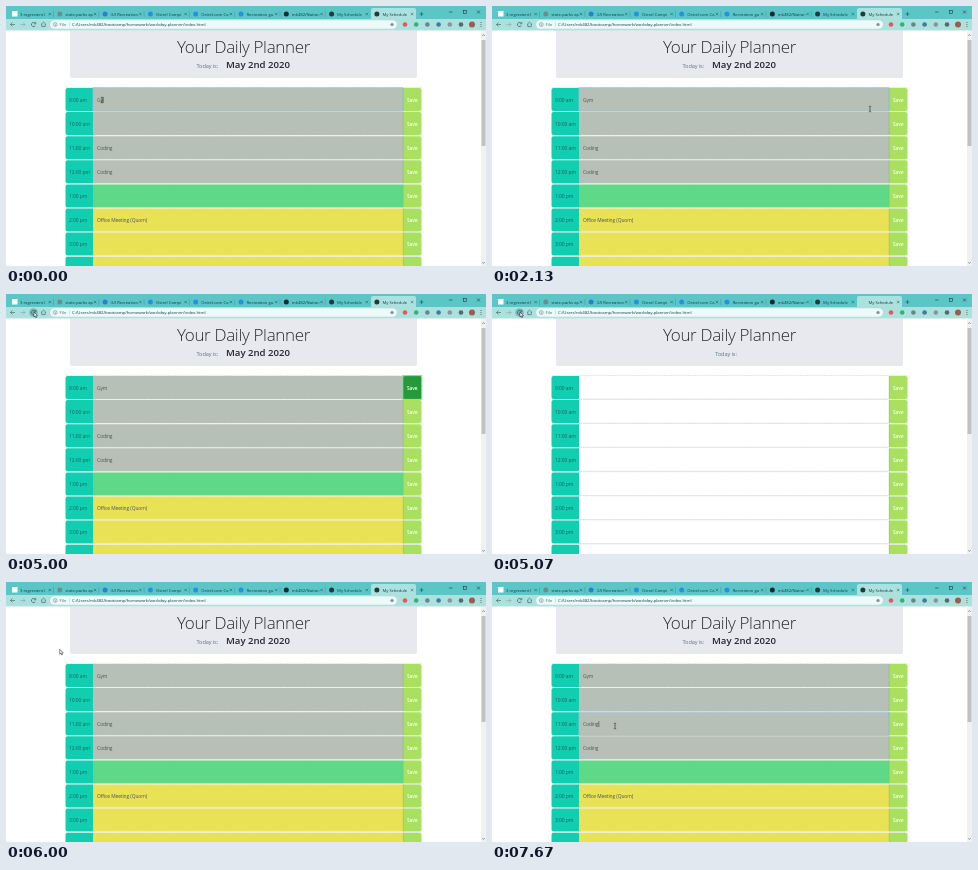
Animation, 480 px wide and 260 px high, one loop 8000 ms. Source, as an HTML page with a canvas:

```html
<!DOCTYPE html>
<html lang="en">
<head>
<meta charset="utf-8">
<title>Your Daily Planner</title>
<style>
html, body { margin: 0; width: 480px; height: 260px; overflow: hidden; background: #fff; }
canvas { display: block; width: 480px; height: 260px; }
</style>
</head>
<body>
<canvas id="stage"></canvas>
<script>
const LOOP = 8000, BLINK = 530;
const FONT = '"Open Sans", "Noto Sans", sans-serif';
const canvas = document.getElementById('stage');
const ctx = canvas.getContext('2d');
const scale = window.devicePixelRatio || 1;
canvas.width = 480 * scale;
canvas.height = 260 * scale;

const COLORS = { past: '#b7c0b6', now: '#5fd987', next: '#eae256', hour: '#12ceb0', save: '#a9e05f', focus: '#259a3b' };
const ROWS = [
  ['9:00 am', 'past', ''], ['10:00 am', 'past', ''], ['11:00 am', 'past', 'Coding'],
  ['12:00 pm', 'past', 'Coding'], ['1:00 pm', 'now', ''],
  ['2:00 pm', 'next', 'Office Meeting (Quom)'], ['3:00 pm', 'next', ''], ['4:00 pm', 'next', '']
];
const TABS = [
  ['3 regrevient l', '#ffffff', 'square'], ['state-parks api', '#6d8c92'], ['(U) Recreation', '#2a7fd0'],
  ['Ostrel Campi', '#2a8fe0'], ['Ostrel.com Ca', '#2a8fe0'], ['Recreation gu', '#2a8fe0'],
  ['mk482/Nation', '#1c2a2e'], ['My Schedule', '#24393d'], ['My Schedule', '#24393d']
];
const URL_TEXT = 'C:/Users/mk482/bootcamp/homework/workday-planner/index.html';

// Pointer path: time, x, y, easing into this point
const PATH = [
  [0, 96, 94], [800, 96, 94], [1330, 103, 97], [1540, 103, 97],
  [2130, 378, 103], [2470, 407, 97], [3540, 407, 97],
  [4400, 30, 21], [4470, 30, 21], [4670, 28, 18], [5340, 28, 18],
  [6000, 53.5, 67, 'in'], [6200, 75, 89, 'out'], [6330, 78, 90],
  [6470, 78, 90], [6670, 71, 100], [6800, 71, 100], [7330, 123, 144], [LOOP, 123, 144]
];
const EASE = {
  in: p => Math.pow(p, 1.5),
  out: p => 1 - (1 - p) * (1 - p),
  both: p => p * p * (3 - 2 * p)
};

const clamp = v => Math.max(0, Math.min(1, v));
const rowTop = i => 82 + 24.1 * i;

function pointerAt(t) {
  const i = PATH.findIndex(k => k[0] > t);
  const a = PATH[i - 1], b = PATH[i];
  const p = EASE[b[3] || 'both']((t - a[0]) / (b[0] - a[0]));
  return { x: a[1] + (b[1] - a[1]) * p, y: a[2] + (b[2] - a[2]) * p };
}

function rect(x, y, w, h, color, radius = 0) {
  ctx.fillStyle = color;
  ctx.beginPath();
  ctx.roundRect(x, y, w, h, radius);
  ctx.fill();
}

function dot(x, y, r, color) {
  ctx.fillStyle = color;
  ctx.beginPath();
  ctx.arc(x, y, r, 0, 7);
  ctx.fill();
}

function line(points, color, width = 0.6) {
  ctx.strokeStyle = color;
  ctx.lineWidth = width;
  ctx.beginPath();
  points.forEach(([x, y], i) => i ? ctx.lineTo(x, y) : ctx.moveTo(x, y));
  ctx.stroke();
}

function text(str, x, y, size, color, weight = 400, align = 'left', spacing = 0) {
  ctx.font = `${weight} ${size}px ${FONT}`;
  ctx.letterSpacing = spacing + 'px';
  ctx.textAlign = align;
  ctx.fillStyle = color;
  ctx.fillText(str, x, y);
  return ctx.measureText(str).width;
}

function drawTabs(loading) {
  rect(0, 0, 480, 13, '#5cc6c7');
  rect(365, 2, 45, 12, '#ace1dd', [2, 2, 0, 0]);
  TABS.forEach(([name, color, shape], i) => {
    const x = 3 + i * 45.3, last = i === TABS.length - 1;
    if (!(last && loading)) {
      if (shape) rect(x + 3, 5, 5.5, 5.5, color);
      else dot(x + 5.5, 8, 2.5, color);
    }
    ctx.save();
    ctx.beginPath();
    ctx.rect(x + 11, 2, 27.5, 11);
    ctx.clip();
    text(name, x + 11, 9.7, 4.2, '#173c40');
    ctx.restore();
    line([[x + 39.5, 6.8], [x + 42, 9.3]], '#244b4f', 0.5);
    line([[x + 42, 6.8], [x + 39.5, 9.3]], '#244b4f', 0.5);
    if (i < 7) line([[x + 44.5, 5], [x + 44.5, 11]], '#348f93', 0.4);
  });
  line([[413.5, 8], [417.5, 8]], '#1d4a4e');
  line([[415.5, 6], [415.5, 10]], '#1d4a4e');
  line([[443, 6], [446.5, 6]], '#173c40');
  ctx.strokeRect(457.5, 4.5, 3, 3);
  line([[471, 4.5], [474, 7.5]], '#173c40');
  line([[474, 4.5], [471, 7.5]], '#173c40');
}

function drawToolbar(hover, pressed) {
  const ink = '#34595c';
  rect(0, 13, 480, 11.5, '#ace1dd');
  line([[9, 18.5], [4.5, 18.5], [6.5, 16.5]], ink);
  line([[4.5, 18.5], [6.5, 20.5]], ink);
  line([[14.5, 18.5], [19, 18.5], [17, 16.5]], '#78a8a8');
  line([[19, 18.5], [17, 20.5]], '#78a8a8');
  if (hover) dot(27.5, 18.5, 4.3, pressed ? '#79b9b8' : '#91cbc8');
  ctx.strokeStyle = ink;
  ctx.lineWidth = 0.7;
  ctx.beginPath();
  ctx.arc(27.5, 18.5, 2.1, 0.5, 5.7);
  ctx.stroke();
  line([[29.8, 15.9], [29.8, 17.8], [27.9, 17.8]], ink);
  line([[35, 18.5], [37.5, 16.2], [40, 18.5]], ink);
  line([[35.8, 18], [35.8, 20.6], [39.2, 20.6], [39.2, 18]], ink);

  rect(44, 14.3, 347, 8.4, '#eefaf9', 4.2);
  ctx.strokeStyle = '#566b6d';
  ctx.lineWidth = 0.5;
  ctx.beginPath();
  ctx.arc(49.3, 18.5, 1.9, 0, 7);
  ctx.stroke();
  line([[49.3, 17.8], [49.3, 19.6]], '#566b6d', 0.5);
  text('File', 53.5, 20, 4.3, '#566b6d');
  line([[63.5, 16.3], [63.5, 20.7]], '#a9bdbd', 0.4);
  text(URL_TEXT, 66, 20, 4.35, '#26383b', 400, 'left', -0.06);
  dot(386, 18.5, 1.6, '#789395');
  ['#e05b55', '#2fb477', '#6c8588', '#3e7d9c', '#8a9698', '#526b70'].forEach((c, i) => dot(399 + i * 11.2, 18.5, 2.3, c));
  dot(466, 18.5, 3, '#9c5b50');
  [-2, 0, 2].forEach(d => dot(475, 18.5 + d, 0.5, ink));
}

function drawScrollbar() {
  rect(475, 24.5, 5, 235.5, '#f1f1f1');
  rect(475.5, 34, 4, 106, '#c1c1c1');
  line([[476.2, 30], [477.5, 28.5], [478.8, 30]], '#666');
  line([[476.2, 256], [477.5, 257.5], [478.8, 256]], '#666');
}

function drawHeader(loading) {
  rect(64, 24.5, 347, 47.5, '#e8e9ee', [0, 0, 2, 2]);
  text('Your Daily Planner', 237.5, 47, 17, '#25292d', 300, 'center', -0.32);
  if (loading) {
    text('Today is:', 234, 62.3, 5.6, '#4c7b80', 400, 'center', -0.1);
  } else {
    text('Today is:', 190.5, 62.3, 5.6, '#4c7b80', 400, 'left', -0.1);
    text('May 2nd 2020', 252, 62.4, 9.6, '#20262b', 600, 'center');
  }
}

function drawRow(i, s) {
  const [hour, kind, note] = ROWS[i];
  const y = rowTop(i), mid = y + 13.6;
  ctx.setLineDash([1, 0.7]);
  line([[60, y - 0.5], [416, y - 0.5]], '#c5cbd0', 0.6);
  ctx.setLineDash([]);
  rect(59.5, y, 27.5, 23, COLORS.hour, [2, 0, 0, 2]);
  rect(87, y, 310, 23, s.loading ? '#fff' : COLORS[kind]);
  if (s.loading) line([[87, y + 23], [397, y + 23]], '#d9dce2', 0.6);
  rect(397, y, 18.5, 23, COLORS.save, [0, 2, 2, 0]);
  text(hour, 63, mid, 4.9, '#1d5b59', 400, 'left', -0.03);

  if (i === 0 && s.dark > 0) {
    ctx.globalAlpha = s.dark;
    rect(397, y, 18.5, 23, COLORS.focus, 1.5);
    ctx.globalAlpha = s.ring;
    ctx.strokeStyle = '#8fd19c';
    ctx.lineWidth = 1;
    ctx.strokeRect(396.8, y - 0.4, 19, 23.8);
    ctx.globalAlpha = 1;
  } else {
    line([[397.2, y], [397.2, y + 23]], '#7fb35d', 0.4);
  }
  text('Save', 406.2, mid, 4.9, '#fff', 600, 'center', -0.1);
  if (s.loading) return;

  const w = text(i ? note : s.typed, 91, mid, 4.9, '#4a544e', 400, 'left', -0.08);
  if (i === s.focus) {
    ctx.strokeStyle = '#8dbdea';
    ctx.lineWidth = 0.8;
    ctx.strokeRect(87, y - 0.2, 310, 23.4);
    if (s.caret) line([[91.4 + w, mid - 4.6], [91.4 + w, mid + 1.2]], '#222', 0.5);
  }
}

function polygon(points, x, y) {
  ctx.beginPath();
  points.forEach(([dx, dy]) => ctx.lineTo(x + dx, y + dy));
  ctx.closePath();
  ctx.fillStyle = '#fff';
  ctx.fill();
  ctx.strokeStyle = '#111';
  ctx.lineWidth = 0.5;
  ctx.stroke();
}

function drawPointer({ x, y }) {
  const onRows = y > 81.5;
  if (onRows && x > 397 && x < 416) {
    polygon([[-0.6, -2], [0.5, -2], [0.6, 0.4], [3, 1], [2.8, 3.6], [2, 4.8], [-0.8, 4.8], [-2.4, 2], [-0.6, 2.4]], x, y);
  } else if (onRows && x > 87 && x < 397) {
    line([[x, y - 2.6], [x, y + 2.6]], '#222', 0.6);
    line([[x - 1.2, y - 2.7], [x + 1.2, y - 2.7]], '#222', 0.5);
    line([[x - 1.2, y + 2.7], [x + 1.2, y + 2.7]], '#222', 0.5);
  } else {
    polygon([[0, 0], [0, 5], [1.1, 4], [1.9, 5.8], [2.7, 5.4], [1.9, 3.7], [3.5, 3.6]], x, y);
  }
}

function stateAt(t) {
  const click = t >= 7530;
  const blinkFrom = click ? 7530 : 200;
  const beforeReload = t < 5070;
  return {
    loading: t >= 5070 && t < 5130,
    typed: t < 200 ? 'Gy' : 'Gym',
    focus: t < 2870 ? 0 : click ? 2 : -1,
    caret: t < 200 || Math.floor((t - blinkFrom) / BLINK) % 2 === 0,
    dark: beforeReload ? clamp((t - 2400) / 130) : 0,
    ring: beforeReload ? clamp((t - 2800) / 130) : 0,
    hover: t >= 4400 && t < 5400,
    pressed: t >= 5000 && t < 5200
  };
}

function draw(t) {
  const s = stateAt(t);
  ctx.setTransform(scale, 0, 0, scale, 0, 0);
  rect(0, 0, 480, 260, '#fff');
  drawHeader(s.loading);
  ROWS.forEach((_, i) => drawRow(i, s));
  drawScrollbar();
  drawTabs(s.loading);
  drawToolbar(s.hover, s.pressed);
  drawPointer(pointerAt(t));
}

const start = performance.now();
function tick() {
  draw((performance.now() - start) % LOOP);
  requestAnimationFrame(tick);
}
tick();
</script>
</body>
</html>
```
